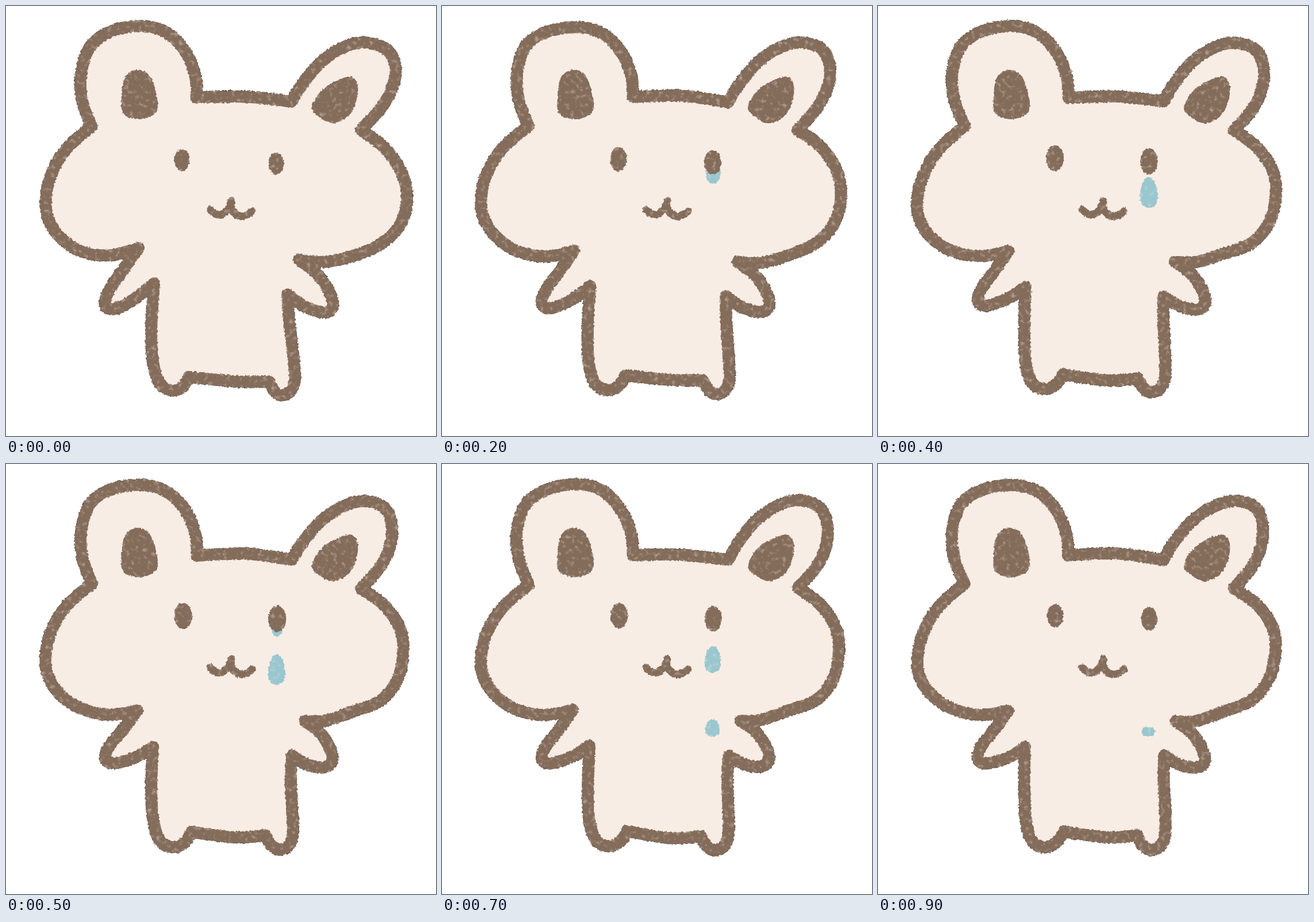
Animation of 748x748 px, one loop 1 s. Source, as an HTML page:

```html
<!DOCTYPE html>
<html lang="en">
<head>
<meta charset="utf-8">
<title>Tearful bear</title>
<style>
  html, body { margin: 0; width: 100%; height: 100%; overflow: hidden; background: #fff; }
  svg { display: block; width: 100vw; height: 100vh; }
  path { stroke-linecap: round; stroke-linejoin: round; }
  .brown { fill: #846c5b; }
  .line { fill: none; stroke: #846c5b; }
</style>
</head>
<body>
<svg viewBox="0 0 748 748">
  <!-- Rough crayon edge with pale grain -->
  <filter id="crayon" filterUnits="userSpaceOnUse" x="0" y="0" width="748" height="748" color-interpolation-filters="sRGB">
    <feTurbulence class="noise" type="fractalNoise" baseFrequency=".25" numOctaves="3" result="rough"/>
    <feDisplacementMap in="SourceGraphic" in2="rough" scale="5" xChannelSelector="R" yChannelSelector="G" result="shape"/>
    <feTurbulence class="noise" type="fractalNoise" baseFrequency=".13" numOctaves="3"/>
    <feColorMatrix values="0 0 0 0 .97  0 0 0 0 .93  0 0 0 0 .89  1.2 0 0 0 -.66"/>
    <feComposite operator="atop" in2="shape"/>
  </filter>
  <g filter="url(#crayon)">
    <path class="body" fill="none" stroke="#54433a" stroke-width="21.6"/>
    <path class="body" fill="#f8ede4"/>
    <path class="body line" stroke-width="20.6"/>
    <path id="tears" fill="#99c7cf"/>
    <path id="ears" class="brown"/>
    <path id="eyes" class="brown"/>
    <path class="line" stroke-width="13" d="M355 354Q372 374 388 351Q391 346 392 339M390 345Q393 362 408 366Q419 366 428 357"/>
  </g>
</svg>
<script>
const $ = id => document.getElementById(id);
const all = name => document.querySelectorAll('.' + name);

// Key points clockwise; every row is a smooth curve ending in a corner
const head = [
  [150,209, 133,165, 130,118, 146,70, 182,45, 235,36, 280,48, 313,83, 329,125, 331,159],
  [415,157, 497,167],
  [515,137, 548,98, 588,72, 625,64, 662,76, 677,108, 670,145, 650,180, 618,216],
  [658,245, 688,288, 697,335, 684,380, 650,414, 600,436, 550,446, 509,442]
];
const trunk = [
  [540,466, 562,497, 569,522, 556,534, 522,524, 490,502],
  [493,545, 499,600, 502,648, 494,670, 478,677, 466,669, 457,653],
  [400,652, 318,645],
  [307,662, 288,669, 267,657, 256,620, 254,560, 258,483],
  [235,502, 210,519, 184,528, 173,518, 182,492, 205,458, 230,422],
  [180,434, 130,426, 95,403, 74,372, 69,338, 79,293, 106,248, 150,209]
];
// Where the drawing sags or lifts as the tear grows: x, y, dx, dy
const drift = [
  [678,105, -7,0], [690,350, -7,-4], [600,436, 0,-6], [509,442, 8,4], [560,533, -2,-8],
  [490,502, 6,5], [462,662, -6,-7], [318,645, 5,-6], [258,483, -2,7], [180,530, 0,-8], [225,424, -2,5]
];

const pairs = a => a.flatMap((v, i) => i % 2 ? [] : [[v, a[i + 1]]]);

// Catmull-Rom curve commands from the first point through the rest
function curve(pts, closed) {
  const n = pts.length;
  const at = i => closed ? pts[(i + n) % n] : pts[Math.max(0, Math.min(n - 1, i))];
  let d = '';
  for (let i = 0; i < (closed ? n : n - 1); i++) {
    const [a, b, c, e] = [at(i - 1), at(i), at(i + 1), at(i + 2)];
    const c1 = b.map((v, k) => v + (c[k] - a[k]) / 6);
    const c2 = c.map((v, k) => v - (e[k] - b[k]) / 6);
    d += `C${c1} ${c2} ${c}`;
  }
  return d;
}
const blob = (...nums) => {
  const pts = pairs(nums);
  return `M${pts[0]}${curve(pts, true)}Z`;
};
const oval = (x, y, rx, ry) =>
  `M${x - rx} ${y}a${rx} ${ry} 0 1 0 ${2 * rx} 0a${rx} ${ry} 0 1 0 ${-2 * rx} 0Z`;

function outline(step, sag) {
  const move = ([px, py]) => {
    let x = px + Math.sin(py / 50 + step * 2.4), y = py + Math.sin(px / 50 + step * 1.7);
    for (const [cx, cy, dx, dy] of drift) {
      const near = sag * Math.exp(-((px - cx) ** 2 + (py - cy) ** 2) / 2600);
      x += near * dx;
      y += near * dy;
    }
    return [x, y];
  };
  let last, d = '';
  for (const row of [...head, ...trunk]) {
    const pts = pairs(row).map(move);
    if (last) pts.unshift(last);
    else d = `M${pts[0]}`;
    d += curve(pts);
    last = pts[pts.length - 1];
  }
  return d + 'Z';
}

// A tear swells behind the eye, falls faster and smaller, then flattens
function tear(age, size) {
  if (age < 0 || age > 7) return '';
  const x = 472 - age / 4, bottom = 300 + 5 * age + 4 * age ** 2;
  if (bottom > 480) return oval(x, 466, 12, 9);
  const h = size * (53 - 11.5 * Math.max(0, age - 4));
  const r = size * (16 - 1.35 * Math.abs(age - 3.3));
  const top = bottom - h, y = bottom - h * .38;
  const side = s => `${x + s * r}`;
  return `M${x} ${top}C${x + r * .7} ${top} ${side(1)} ${y - h * .2} ${side(1)} ${y}` +
    `C${side(1)} ${bottom - h * .1} ${side(.55)} ${bottom} ${x} ${bottom}` +
    `C${side(-.55)} ${bottom} ${side(-1)} ${bottom - h * .1} ${side(-1)} ${y}` +
    `C${side(-1)} ${y - h * .2} ${x - r * .7} ${top} ${x} ${top}Z`;
}

function draw(step) {
  const set = (el, d) => el.setAttribute('d', d);
  const sag = Math.min(1, step / 5), swell = Math.sin(Math.PI * step / 10);
  const rx = 13.3 + 2.2 * swell, ry = 19 + 3.8 * swell;

  const body = outline(step, sag);
  all('body').forEach(el => set(el, body));
  all('noise').forEach(el => el.setAttribute('seed', step + 1));
  set($('eyes'), oval(306 + 2.3 * sag, 268 - 4 * sag, rx, ry) + oval(470 + 1.8 * sag, 274 - 4.8 * sag, rx, ry));
  set($('tears'), tear(step - 1, 1) + tear((step - 5) * 1.7, .88));
}

set_ears: {
  $('ears').setAttribute('d',
    blob(228,111, 207,124, 201,158, 204,187, 232,197, 260,186, 263,160, 250,122) +
    blob(595,123, 611,135, 610,163, 597,190, 570,204, 546,194, 532,176, 553,143));
}

let shown = -1;
function tick(now) {
  const step = Math.floor(now % 1000 / 100);
  if (step !== shown) draw(shown = step);
  requestAnimationFrame(tick);
}
draw(0);
requestAnimationFrame(tick);
</script>
</body>
</html>
```
